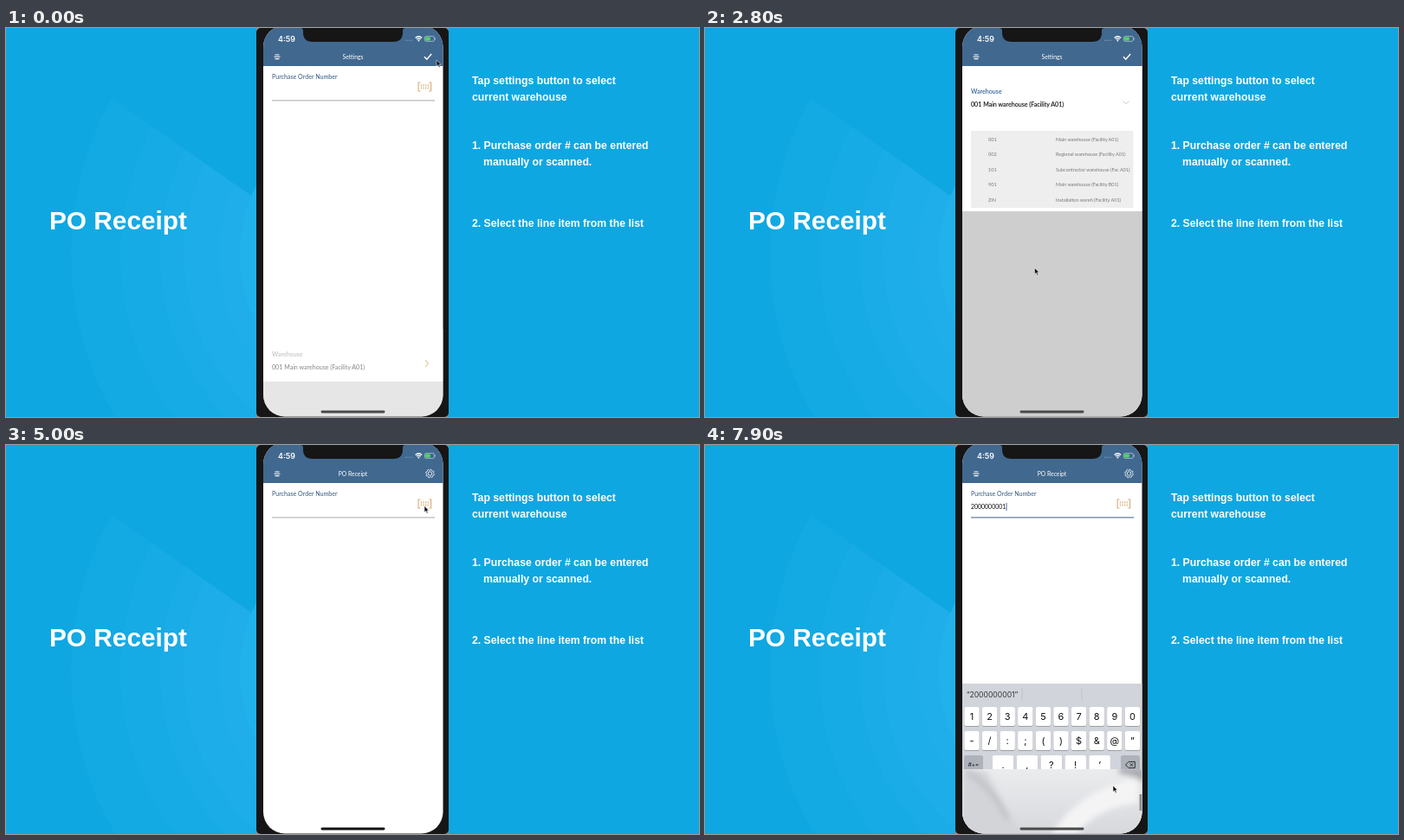
An HTML page that plays this animation: 800x450 px, repeating every 8 s.

```html
<!DOCTYPE html>
<html lang="en">
<head>
<meta charset="utf-8">
<title>PO Receipt</title>
<style>
  html, body { margin: 0; width: 100%; height: 100%; overflow: hidden; background: #0fa7e1; }
  svg { display: block; width: 100vw; height: 100vh; }
  .big { font: bold 29.8px "Liberation Sans", Arial, sans-serif; fill: #fff; }
  .note { font: bold 12.25px "Liberation Sans", Arial, sans-serif; fill: #fff; }
  .ui { font: 7.1px Lato, sans-serif; }
  .item { font: 5.5px Lato, sans-serif; fill: #777; }
  .key { font: 11px Inter, sans-serif; fill: #111; text-anchor: middle; }
</style>
</head>
<body>
<svg id="stage" viewBox="0 0 800 450" xmlns="http://www.w3.org/2000/svg"></svg>
<script>
const LOOP = 8000;
const STEP = 100;

const text = (x, y, cls, str, extra = '') =>
  `<text x="${x}" y="${y}" class="${cls}" ${extra}>${str}</text>`;
const rect = (x, y, w, h, fill, extra = '') =>
  `<rect x="${x}" y="${y}" width="${w}" height="${h}" fill="${fill}" ${extra}/>`;
const line = (d, stroke, width = 1, extra = '') =>
  `<path d="${d}" fill="none" stroke="${stroke}" stroke-width="${width}" ${extra}/>`;

// ---- Backdrop and captions ----
function backdrop() {
  const rings = [373, 316, 270, 243, 203]
    .map(r => `<circle cx="448" cy="262" r="${r}" fill="#35b9f0" opacity=".11"/>`).join('');
  return rect(0, 0, 800, 450, '#0fa7e1') +
    `<g clip-path="url(#fan)">${rings}</g>` +
    `<circle cx="448" cy="262" r="178" fill="#22b2eb" clip-path="url(#leftHalf)"/>`;
}

function captions() {
  return text(50, 233, 'big', 'PO Receipt') +
    text(538, 65, 'note', 'Tap settings button to select') +
    text(538, 83.7, 'note', 'current warehouse') +
    text(538, 140, 'note', '1. Purchase order # can be entered') +
    text(551, 158.7, 'note', 'manually or scanned.') +
    text(538, 229.7, 'note', '2. Select the line item from the list');
}

// ---- Phone parts ----
function gear() {
  let d = '';
  for (let i = 0; i <= 48; i++) {
    const a = i / 48 * Math.PI * 2;
    const r = 4.4 + 0.5 * Math.sign(Math.sin(a * 8));
    d += `${i ? 'L' : 'M'}${(489.5 + r * Math.cos(a)).toFixed(2)} ${(33 + r * Math.sin(a)).toFixed(2)}`;
  }
  return line(d, '#fff', 0.8) + '<circle cx="489.5" cy="33" r="2.2" fill="none" stroke="#fff" stroke-width=".8"/>';
}

function header() {
  const title = (id, str) =>
    text(400.5, 36, 'ui', str, `id="${id}" fill="#fff" text-anchor="middle" style="font-size:6.8px"`);
  return rect(297, 0, 208, 44, '#41688f') +
    text(314, 16, '', '4:59', 'fill="#fff" style="font:600 8.9px Inter,sans-serif"') +
    line('M461 14.3h9', '#a9bccf', 0.8, 'stroke-dasharray="1 1.2"') +
    line('M472.6 11.4q3.8-3.4 7.6 0M474.1 13.1q2.3-2 4.6 0', '#fff', 1.3) +
    '<circle cx="476.4" cy="14.6" r="1" fill="#fff"/>' +
    rect(483.4, 9.6, 11, 5.8, 'none', 'rx="1.6" stroke="#c3d0dc" stroke-width=".7"') +
    rect(484.2, 10.4, 5.6, 4.2, '#4cd964', 'rx=".8"') +
    line('M495.3 11.5v2', '#c3d0dc', 0.8) +
    line('M310.5 31h5M309.5 33.3h7M310.5 35.6h5', '#fff', 1.1) +
    title('settingsTitle', 'Settings') + title('receiptTitle', 'PO Receipt') +
    `<g id="check">${line('M483 33.2l2.8 3 5.4-6.2', '#fff', 1.4)}</g>` +
    `<g id="gear">${gear()}</g>`;
}

function form() {
  const tan = '#d5ae79';
  return text(307, 59, 'ui', 'Purchase Order Number', 'fill="#33567d"') +
    line('M478.5 63h-2.4v10h2.4M488.2 63h2.4v10h-2.4', tan, 1.1) +
    line('M479.4 65.3v5.6M482 65.3v5.6M484.6 65.3v5.6M487.2 65.3v5.6', tan, 1.1, 'stroke-dasharray="2.2 .9"') +
    rect(307, 83.4, 188, 1, '#a9a9a9', 'id="rule"') +
    text(307, 74.2, 'ui', '', 'id="entry" fill="#111" style="font-size:6.95px"') +
    rect(307, 67, 0.9, 9, '#2f5d94', 'id="caret"');
}

function sheet() {
  const rows = [
    ['001', 'Main warehouse (Facility A01)'],
    ['002', 'Regional warehouse (Facility A01)'],
    ['101', 'Subcontractor warehouse (Fac A01)'],
    ['901', 'Main warehouse (Facility B01)'],
    ['ZIN', 'Installation wareh (Facility A01)']
  ].map(([code, name], i) => {
    const y = 130.5 + i * 17.6;
    return text(327, y, 'item', code) + text(405, y, 'item', name);
  }).join('');
  return `<g clip-path="url(#body)"><g id="sheet">
    ${rect(297, 44, 208, 410, '#cecece')}
    ${rect(297, 44, 208, 61, '#fff', 'id="paper"')}
    ${text(307, 76, 'ui', 'Warehouse', 'id="houseLabel"')}
    ${text(307, 91.3, 'ui', '001 Main warehouse (Facility A01)', 'fill="#111" id="house"')}
    <g id="closedMark">${line('M484 80l3.6 4-3.6 4', '#c9a265', 1.2)}</g>
    <g id="openMark">${line('M482.4 84.5l3.6 3.2 3.6-3.2', '#c9c9c9', 0.9)}</g>
    <g id="list" clip-path="url(#paperClip)">${rect(307, 119, 187.5, 89, '#eee')}${rows}</g>
  </g></g>`;
}

// ---- Keyboard ----
const keyX = i => 308 + i * 20.6;

function key(cx, y, w, label, dark, size = 11) {
  const x = cx - w / 2;
  return rect(x, y + 0.8, w, 22, '#8b8e94', 'rx="2.6"') +
    rect(x, y, w, 22, dark ? '#adb2bb' : '#fff', 'rx="2.6"') +
    text(cx, y + 11 + size * 0.36, 'key', label, `style="font-size:${size}px"`);
}

function keyboard() {
  const row = (chars, y) => [...chars].map((c, i) =>
    key(keyX(i), y, 17.4, c === '&' ? '&amp;' : c)).join('');
  const marks = [...'.,?!’'].map((c, i) => key(344 + i * 27.9, 359, 24.6, c)).join('');
  return rect(297, 276, 208, 174, '#d1d4da') +
    line('M366 281v15M435 281v15', '#bdc0c7', 0.8) +
    text(331.5, 292, 'key', '', 'id="hint" style="font-size:8.6px;fill:#333"') +
    row('1234567890', 303) + row('-/:;()$&@”', 331) +
    key(310, 359, 22, '#+=', true, 6.4) + marks + key(491, 359, 22, '', true) +
    line('M485.5 370l3.5-3.6h7.3v7.2h-7.3zM490.6 368.2l3.6 3.6m0-3.6l-3.6 3.6', '#222', 0.9) +
    key(323.3, 387, 48.6, 'ABC', true, 8) + key(400.7, 387, 99.6, 'space', false, 8) +
    key(478, 387, 48.4, 'return', true, 8) +
    '<circle cx="317.5" cy="429" r="6.5" fill="none" stroke="#4f545c"/>' +
    '<circle cx="315.2" cy="427" r=".9" fill="#4f545c"/><circle cx="319.8" cy="427" r=".9" fill="#4f545c"/>' +
    line('M313.6 430.6q3.9 4.6 7.8 0z', '#4f545c', 0.9) +
    rect(482, 421.5, 4, 9, 'none', 'rx="2" stroke="#4f545c"') +
    line('M479.6 427.5q0 5.6 4.4 5.6t4.4-5.6M484 433v3M481.5 436h5', '#4f545c', 0.9) +
    `<g id="bubble"><path fill="#fff"/>${text(0, 292, 'key', '', 'style="font-size:18px"')}</g>`;
}

// Soft wipe that covers the lower keys
function wipe() {
  return `<g id="wipe" clip-path="url(#wipeClip)">
    ${rect(297, 375, 208, 75, 'url(#haze)')}
    <g filter="url(#soft)">
      <path d="M297 372L325 378 364 450H297z" fill="#d2d4d8"/>
      <path d="M303 376q28 14 49 56l-5 2q-18-36-44-52z" fill="#bfc1c6"/>
      <path d="M400 450q30-50 100-66v30q-50 6-70 36z" fill="#f4f4f5"/>
      <path d="M478 373h30v20q-8-10-30-13z" fill="#a9abb0"/>
    </g>
    ${rect(501.5, 404, 3, 19, '#8d8f94')}
  </g>`;
}

const clip = (id, shape) => `<clipPath id="${id}">${shape}</clipPath>`;
const stage = document.getElementById('stage');
stage.innerHTML = `<defs>
  ${clip('fan', '<path d="M448 309L0 -4V450H448z"/>')}
  ${clip('leftHalf', '<path d="M0 0H400V450H0z"/>')}
  ${clip('screen', '<rect x="297" y="-3" width="207.5" height="452.5" rx="25"/>')}
  ${clip('body', '<path d="M297 44H505V450H297z"/>')}
  ${clip('paperClip', '<rect id="paperMask" x="297" y="44" width="208" height="61"/>')}
  ${clip('wipeClip', '<path d="M297 375H505V450H297z"/>')}
  <linearGradient id="haze" x2="0" y2="1"><stop stop-color="#ebecee"/><stop offset="1" stop-color="#d6d8dc"/></linearGradient>
  <filter id="soft"><feGaussianBlur stdDeviation="3"/></filter>
  </defs>
  ${backdrop()}${captions()}
  ${rect(289, 0, 222, 450, '#8f8b8b')}${rect(289, 0, 222, 450, '#161616', 'rx="5"')}
  <g clip-path="url(#screen)">
    ${rect(297, -3, 208, 453, '#fff')}${form()}${sheet()}${header()}
    <g id="keys">${keyboard()}</g>${wipe()}
    ${rect(363.5, 442.6, 74, 2.8, '#111', 'rx="1.4" id="home"')}
  </g>
  <path d="M340 0q3 0 3 3v2q0 11 11 11h93q11 0 11-11V3q0-3 3-3z" fill="#161616"/>
  <path id="cursor" d="M0 0V7.2L1.7 5.7 2.9 8.4 4.1 7.9 3 5.3H5.2z" fill="#111" stroke="#fff" stroke-width=".5"/>`;

const el = {};
stage.querySelectorAll('[id]').forEach(n => { el[n.id] = n; });
const set = (n, attrs) => { for (const k in attrs) n.setAttribute(k, attrs[k]); };
const show = (n, on) => set(n, { display: on ? 'inline' : 'none' });

// ---- Motion ----
const ease = p => p * p * (3 - 2 * p);
const ramp = (t, from, to) => ease(Math.min(1, Math.max(0, (t - from) / (to - from))));

// time, x, y of the pointer tip
const PATH = [
  [300, 497, 37], [500, 484, 80], [1100, 484, 80], [1500, 415.5, 64.5], [1900, 400, 150],
  [2100, 397, 165], [2800, 380.5, 277.5], [3000, 380.5, 277.5], [3300, 487, 32],
  [3600, 487, 32], [3900, 483, 70.5], [5400, 483, 70.5], [5700, 356, 72.5],
  [5900, 356, 72.5], [6200, 326, 317], [6300, 326, 317], [6500, 478, 310],
  [7300, 478, 310], [7450, 307, 312], [7500, 307, 312], [7700, 471, 394]
];

function pointer(t) {
  const i = PATH.findIndex(p => p[0] >= t);
  if (i === 0) return PATH[0].slice(1);
  if (i < 0) return PATH[PATH.length - 1].slice(1);
  const [t0, x0, y0] = PATH[i - 1], [t1, x1, y1] = PATH[i];
  const p = ramp(t, t0, t1);
  return [x0 + (x1 - x0) * p, y0 + (y1 - y0) * p];
}

function typed(t) {
  if (t < 6300) return '';
  const zeros = Math.min(8, Math.max(0, Math.floor((t - 6500) / 100)));
  return '2' + '0'.repeat(zeros) + (t >= 7500 ? '1' : '');
}

function pressed(t) {
  if (t === 6300) return '2';
  if (t >= 6500 && t <= 7300) return '0';
  return t === 7500 ? '1' : '';
}

function drawBubble(digit) {
  show(el.bubble, digit);
  if (!digit) return;
  const kx = keyX('1234567890'.indexOf(digit));
  const cx = Math.min(487.8, Math.max(313.2, kx));
  const l = cx - 15.8, r = cx + 15.8, a = kx - 8.7, b = kx + 8.7;
  const [shape, label] = el.bubble.children;
  set(shape, { d: `M${l + 4} 272H${r - 4}Q${r} 272 ${r} 276V295C${r} 303 ${b} 302 ${b} 311V325H${a}V311C${a} 304 ${l} 303 ${l} 295V276Q${l} 272 ${l + 4} 272z` });
  set(label, { x: cx });
  label.textContent = digit;
}

function drawSheet(t) {
  const closing = t >= 3400;
  const shift = closing ? 380 * ramp(t, 3400, 3800) : 304 * (1 - ramp(t, 200, 500));
  const alpha = closing ? 1 - ramp(t, 3400, 3800) : 0.5 + 0.5 * ramp(t, 200, 500);
  const height = 61 + 107 * ramp(t, 1100, 1400);
  const open = t >= 1200;
  set(el.sheet, { transform: `translate(0 ${shift})`, opacity: alpha });
  show(el.sheet, t < 3800);
  set(el.paper, { height });
  set(el.paperMask, { height });
  show(el.list, open);
  show(el.openMark, open);
  show(el.closedMark, !open);
  set(el.houseLabel, { fill: open ? '#33639b' : '#77777f', 'font-weight': 400 });
  el.houseLabel.style.fontWeight = open ? 600 : 400;
  set(el.house, { stroke: '#111', 'stroke-width': open ? 0.12 : 0 });
}

function render(t) {
  const settings = t < 3500;
  const focus = t >= 5900;
  const value = typed(t);

  drawSheet(t);
  for (const id of ['settingsTitle', 'check']) show(el[id], settings);
  for (const id of ['receiptTitle', 'gear']) show(el[id], !settings);

  el.entry.textContent = value;
  el.hint.textContent = value && `“${value}”`;
  set(el.rule, { fill: focus ? '#3f5f82' : '#a9a9a9' });
  show(el.caret, focus);
  set(el.caret, { x: 307.3 + (value ? el.entry.getComputedTextLength() : 0) });

  set(el.keys, { transform: `translate(0 ${174 * (1 - ramp(t, 5800, 6100))})` });
  show(el.keys, focus);
  drawBubble(pressed(t));
  show(el.wipe, t >= 7600);
  set(el.wipe, { opacity: 0.4 + 0.6 * ramp(t, 7500, 7800) });
  set(el.home, { fill: settings || t >= 7600 ? '#4a4a4a' : '#111' });

  const [x, y] = pointer(t);
  set(el.cursor, { transform: `translate(${x} ${y})` });
}

const start = performance.now();
function tick() {
  const t = (performance.now() - start) % LOOP;
  render(Math.floor(t / STEP) * STEP);
  requestAnimationFrame(tick);
}
tick();
</script>
</body>
</html>
```
